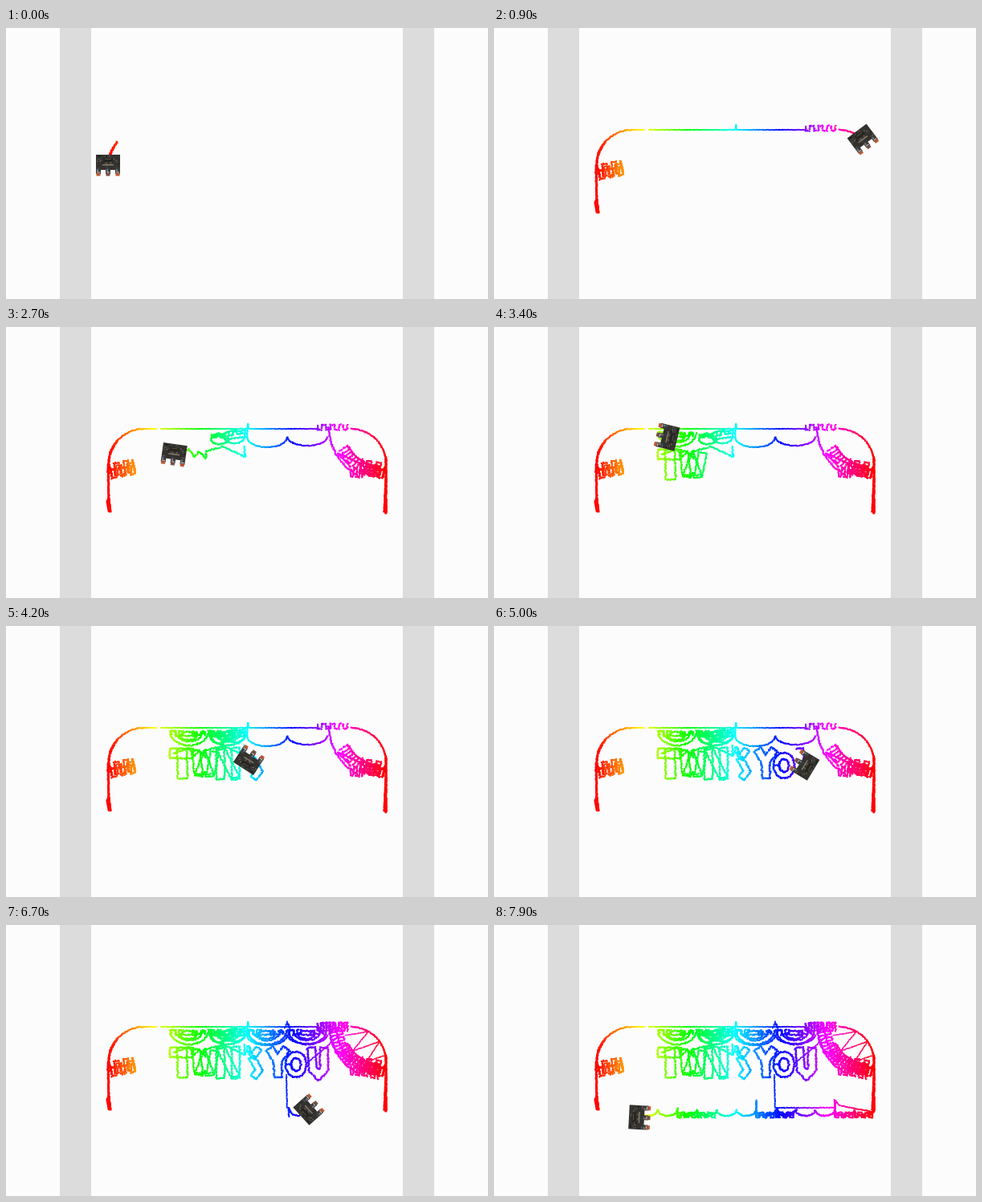
An HTML page with a canvas for the animation above (8000 ms loop, 600 px wide and 338 px high).

```html
<!DOCTYPE html>
<html lang="en">
<head>
<meta charset="utf-8">
<title>Plotting robot</title>
<style>
  html, body { margin: 0; width: 100%; height: 100%; overflow: hidden; background: #fdfcfd; }
  canvas { display: block; }
</style>
</head>
<body>
<canvas id="stage" width="600" height="338"></canvas>
<script>
const ctx = document.getElementById('stage').getContext('2d');
const LOOP = 8000, STEP = 100, RAD = Math.PI / 180;

let seed = 7;
const rand = () => (seed = (seed * 16807) % 2147483647) / 2147483647;
const line = text => text.split(' ').map(p => p.split(',').map(Number));
const mirror = pts => pts.map(([x, y]) => [601 - x, y]);
const thereAndBack = pts => [...pts, ...pts.slice(1, -1).reverse()];
const polar = (cx, cy, rx, ry, a) => [cx + rx * Math.cos(a * RAD), cy + ry * Math.sin(a * RAD)];
const range = (n, f) => Array.from({ length: n }, (_, i) => f(i));

function normal([ax, ay], [bx, by]) {
  const len = Math.hypot(bx - ax, by - ay);
  return [(by - ay) / len, (ax - bx) / len];
}

function arc(cx, cy, rx, ry, from, to) {
  return range(25, i => polar(cx, cy, rx, ry, from + (to - from) * i / 24));
}

// Rungs between two concentric arcs
function rungs(cx, cy, inner, outer, from, to, n) {
  return range(n + 1, i => {
    const a = from + (to - from) * i / n;
    const ends = [inner, outer].map(r => polar(cx, cy, r, r, a));
    return i % 2 ? ends.reverse() : ends;
  }).flat();
}

// Square wave along a straight axis
function wave(from, to, half, n) {
  const [nx, ny] = normal(from, to);
  return range(n * 2, i => {
    const f = (i >> 1) / (n - 1), side = [1, -1, -1, 1][i % 4] * half;
    return [from[0] + (to[0] - from[0]) * f + nx * side, from[1] + (to[1] - from[1]) * f + ny * side];
  });
}

// Walks round a closed tour of a letter's skeleton at distance r
function outline(tour, r) {
  const n = tour.length;
  const pts = tour.flatMap((p, i) => {
    const a = normal(tour[(i + n - 1) % n], p), b = normal(p, tour[(i + 1) % n]);
    const dot = a[0] * b[0] + a[1] * b[1];
    const shift = v => [p[0] + r * v[0], p[1] + r * v[1]];
    if (dot < -0.8) return [shift(a), shift(b)];
    return [shift([(a[0] + b[0]) / (1 + dot), (a[1] + b[1]) / (1 + dot)])];
  });
  return [...pts, pts[0]];
}
const letter = (text, r) => outline(thereAndBack(line(text)), r);

const rosette = cx => [
  ...arc(cx, 131, 24, 18, 0, 180),
  ...arc(cx, 131, 17, 13, 180, 0),
  ...wave([cx + 20, 134], [cx + 4, 134], 2, 4),
  ...arc(cx - 1, 137, 10, 5, 0, 360),
  ...wave([cx - 8, 134], [cx - 22, 134], 3, 4)
];

// Each leg becomes evenly spaced dots carrying the time they are inked
const dots = [];
let clock = -100;
function leg(end, width, pts, wobble = 0.75) {
  const lengths = pts.slice(1).map((p, i) => Math.hypot(p[0] - pts[i][0], p[1] - pts[i][1]));
  const total = lengths.reduce((a, b) => a + b, 0);
  let done = 0;
  lengths.forEach((len, i) => {
    const [ax, ay] = pts[i], [bx, by] = pts[i + 1];
    const n = Math.max(1, Math.ceil(len / 1.2));
    for (let k = 1; k <= n; k++) {
      const f = k / n;
      dots.push({
        t: clock + (end - clock) * (done + len * f) / total,
        x: ax + (bx - ax) * f, y: ay + (by - ay) * f,
        dx: (rand() * 2 - 1) * wobble, dy: (rand() * 2 - 1) * wobble, width
      });
    }
    done += len;
  });
  clock = end;
}

// Left column and bracket
const bracket = [
  ...wave([130, 180], [159, 174], 9, 6),
  ...wave([160, 177], [131, 182], 4, 8),
  ...wave([130, 177], [158, 171], 2, 5)
];
leg(0, 2.4, [...arc(172, 170, 44, 43, 222, 196), [127, 171]]);
leg(100, 2.7, line('127,171 128,213'), 0.4);
leg(200, 2.7, line('128,213 126,217 128,230 130,230 128,214'), 0.4);
leg(450, 2, bracket);

// Arch, top rail and right column
leg(560, 2, arc(172, 170, 44, 43, 180, 270), 0.5);
leg(580, 1.8, line('172,127 187,127'), 0.3);
leg(690, 1.8, line('192,127 300,127'), 0.3);
leg(710, 1.8, line('300,127 301,121 302,127'), 0.4);
leg(790, 1.8, line('302,127 388,127'), 0.3);
leg(850, 1.9, wave([388, 125], [425, 125], 3, 8));
leg(950, 2, arc(429, 170, 44, 43, 270, 360), 0.5);
leg(1200, 2.7, line('473,162 473,232 471,230 473,190'), 0.4);
leg(1570, 2, mirror(bracket));
leg(1700, 2.2, line('445,172 413,157 418,163 429,174'));

// Curved band and the scallops under the rail
leg(1800, 2, wave([429, 181], [444, 183], 5, 5));
leg(1950, 2, rungs(470, 125, 50, 62, 95, 152, 12));
leg(2030, 2, arc(470, 125, 50, 50, 152, 95));
leg(2150, 2, arc(470, 125, 68, 68, 118, 180));
leg(2260, 1.9, arc(375, 137, 25, 11, 0, 180), 0.5);
leg(2380, 1.9, [...arc(325, 137, 25, 13, 0, 180), [301, 122]], 0.5);
leg(2560, 2, [...arc(284, 137, 13, 8, 0, 360), ...arc(266, 140, 11, 6, 0, 360), ...wave([256, 136], [298, 131], 2, 9)]);
leg(2700, 2, line('296,148 298,162 270,149 249,155 249,164 240,155 235,162 228,153 209,159'));

// Lettering and the rosettes above it
leg(2960, 2, outline(line('204,159 219,159 220,190 219,159 233,159 219,159'), 6));
leg(3160, 2, letter('236,155 240,186 247,168 254,186 260,157', 5));
leg(3420, 2, rosette(228));
leg(3720, 2, rosette(276));
leg(4060, 2, letter('267,191 267,153 286,190 286,152', 5));
leg(4200, 2.1, letter('306,165 315,181 308,190', 4));
leg(4450, 2, [...arc(302, 155, 2, 4, 0, 360), ...letter('306,165 315,154', 4)]);
leg(4720, 2.1, outline(line('328,154 338,170 349,154 338,170 339,190 338,170'), 5));
leg(4950, 2.1, [...arc(361, 174, 13, 16, 180, 540), ...arc(361, 174, 6, 8, 180, 540)]);
leg(5220, 2.1, letter('380,153 382,180 389,187 396,180 396,153', 5));
leg(5540, 2, rosette(325));
leg(5600, 1.8, line('347,129 350,121 353,129'));
leg(6040, 2, rosette(375));

// Box, band filling, spokes and the drop to the lower edge
leg(6130, 2, wave([388, 127], [425, 127], 5, 11));
leg(6250, 2, rungs(470, 125, 52, 67, 176, 96, 20));
leg(6330, 2, arc(470, 125, 59, 59, 96, 178));
const spokes = range(3, i => [polar(470, 125, 50, 50, 165 - 25 * i), polar(429, 170, 44, 43, 300 + 25 * i)]).flat();
leg(6440, 1.5, spokes, 0.3);
leg(6520, 1.6, line('418,135 400,151 375,172'), 0.4);
leg(6620, 1.7, line('349,186 350,228'), 0.4);
leg(6700, 2, line('352,240 352,228 356,236 364,238 377,230'), 0.5);

// Lower edge
leg(6850, 1.8, line('352,228 425,228'), 0.4);
leg(7000, 1.8, line('425,240 424,218 430,225 471,233'), 0.4);
const fringe = range(12, i => {
  const cx = 461 - 24.5 * i, left = cx - 12;
  const pts = arc(cx, 231, 12, 7, 0, 180);
  if (i % 4 === 1) pts.push([left, i < 9 ? 219 : 228]);
  if (i % 4 < 2) pts.push(...wave([left, 237], [cx + 10, 237], 3, 6), [left, 238]);
  return pts;
}).flat();
leg(7900, 2, [...fringe, [181, 240]], 0.6);

const turns = line('0,0 1700,-70 2700,8 4200,213 5900,18 6700,-132 7900,-87');
function angleAt(t) {
  const i = Math.max(1, turns.findIndex(k => k[0] >= t));
  const [t0, a0] = turns[i - 1], [t1, a1] = turns[i];
  return a0 + (a1 - a0) * (t - t0) / (t1 - t0);
}

const tones = ['#4d4c46', '#171716', '#5d574b', '#3a4248', '#6b6256'];
const flecks = range(46, () => ({
  x: -14 + rand() * 27, y: -12 + rand() * 14, tone: tones[Math.floor(rand() * tones.length)]
}));

function box(color, x, y, w, h) {
  ctx.fillStyle = color;
  ctx.fillRect(x, y, w, h);
}

function robot(x, y, angle) {
  ctx.save();
  ctx.translate(x, y);
  ctx.rotate(angle * RAD);
  box('#33322e', -15, -13, 30, 16);
  box('#33322e', -11, 2, 22, 4);
  flecks.forEach(f => box(f.tone, f.x, f.y, 2, 1.2));
  box('#88796a', -7, -1, 14, 1.5);
  box('#25241f', -6, -9, 12, 5);
  box('#5b5548', -4, -8, 8, 1);
  for (const leftEdge of [-15, -3, 9]) {
    box('#3a3a3a', leftEdge, 3, 6, 8);
    box('#73777f', leftEdge + 1, 5, 2, 3);
    box('#d8d4ce', leftEdge + 1, 8.5, 4, 1);
    box(leftEdge === -3 ? '#765044' : '#bd5733', leftEdge + 0.5, 10, 5, 3.5);
  }
  ctx.restore();
}

function render(t) {
  box('#fdfcfd', 0, 0, 600, 338);
  box('#dcdcdc', 67, 0, 39, 338);
  box('#dcdcdc', 494, 0, 39, 338);
  let pen = dots[0];
  for (const d of dots) {
    if (d.t > t + 0.01) break;
    pen = d;
    const hue = Math.min(360, Math.max(0, (d.x - 127) / 346 * 360));
    box(`hsl(${hue} 100% 50%)`, d.x + d.dx - d.width / 2, d.y + d.dy - d.width / 2, d.width, d.width);
  }
  robot(pen.x, pen.y, angleAt(t));
}

let shown = -1;
function tick() {
  const t = Math.floor(performance.now() % LOOP / STEP) * STEP;
  if (t !== shown) render(shown = t);
  requestAnimationFrame(tick);
}
tick();
</script>
</body>
</html>
```
